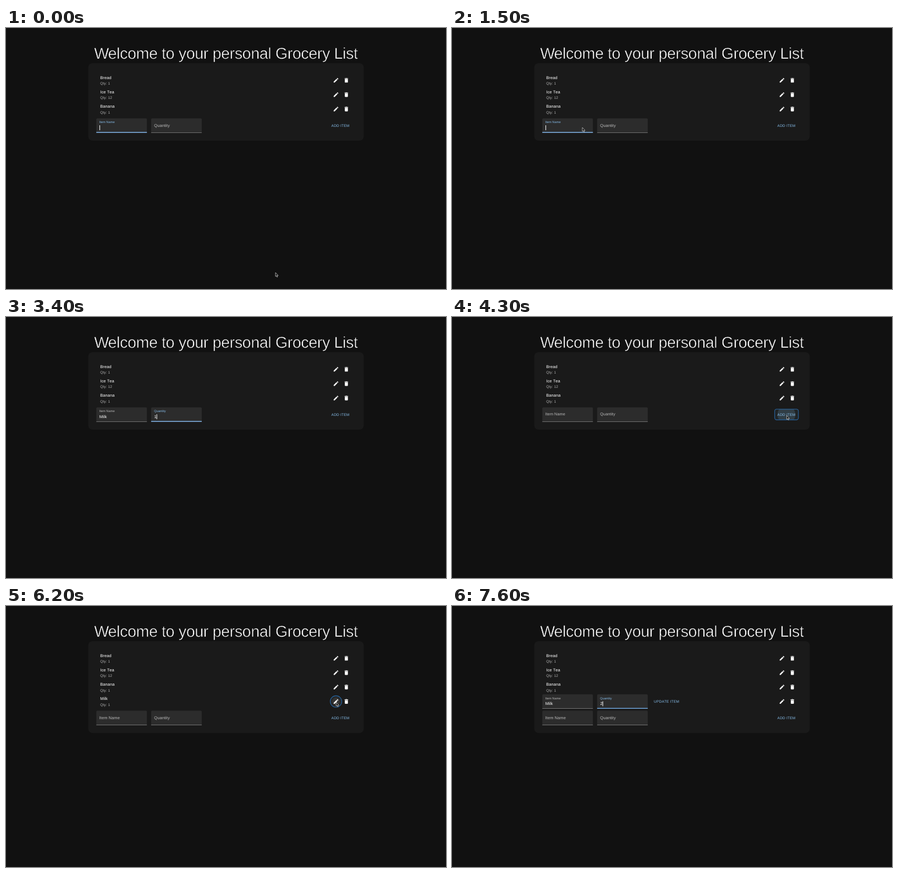
Recreate the animation shown at these times as an HTML page. Size 800x475 px, loop 8000 ms.

```html
<!DOCTYPE html>
<html lang="en">
<head>
<meta charset="utf-8">
<title>Grocery List</title>
<style>
  html, body { margin: 0; width: 100%; height: 100%; overflow: hidden; background: #111; }
  svg { display: block; width: 100%; height: 100%; }
  text {
    font-family: "Liberation Sans", Arial, sans-serif;
    font-kerning: none; white-space: pre; text-rendering: geometricPrecision;
  }
  /* A background-coloured outline thins the strokes to a light weight. */
  .title { font-size: 28.7px; letter-spacing: -.41px; fill: #fff; stroke: #111; stroke-width: .6px; }
  .title .w { letter-spacing: -1.9px; }
  .panel { fill: #1a1a1a; }
  .body { font-size: 7.5px; letter-spacing: .07px; fill: #fff; }
  .small { font-size: 6.56px; letter-spacing: .07px; fill: #b4b4b4; }
  .action { font-size: 6.56px; letter-spacing: .187px; fill: #88bfec; }
  .icon { fill: #fff; }
  .box { fill: #2c2c2c; }
  .line { fill: #a6a6a6; }
  .active { fill: #74ade6; }
  .label { font-size: 7.5px; letter-spacing: .07px; fill: #bababa; }
  .label.on { fill: #85bbe8; }
  .caret { fill: #fff; }
  .ring { fill: none; stroke: #2868a6; stroke-width: 1.1; }
  .tint { fill: #90caf9; }
  .glow { fill: #fff; }
  .mouse { fill: #111; stroke: #eee; stroke-width: .65; stroke-linejoin: round; }
</style>
</head>
<body>
<svg id="stage" viewBox="0 0 800 475">
  <defs>
    <path id="edit" d="M3 17.25V21h3.75L17.81 9.94l-3.75-3.75L3 17.25zM20.71 7.04c.39-.39.39-1.02 0-1.41l-2.34-2.34c-.39-.39-1.02-.39-1.41 0l-1.83 1.83 3.75 3.75 1.83-1.83z"/>
    <path id="bin" d="M6 19c0 1.1.9 2 2 2h8c1.1 0 2-.9 2-2V7H6v12zM19 4h-3.5l-1-1h-5l-1 1H5v2h14V4z"/>
    <clipPath id="pill"><rect x="587" y="168" width="42.5" height="18.8" rx="3"/></clipPath>
  </defs>
  <rect id="panel" class="panel" x="149.5" y="64" width="501" height="141" rx="8"/>
  <text class="title" x="160.3" y="56.1"><tspan class="w">W</tspan>elcome to your personal Grocery List</text>
  <g id="rows"></g>
  <g id="pencil">
    <circle id="pencilHover" class="glow" cx="600" cy="173.8" r="9.4" opacity=".06"/>
    <circle id="pencilRipple" class="glow" cx="600" cy="173.8" r="0"/>
    <circle class="ring" cx="600" cy="173.8" r="10.4"/>
  </g>
  <g id="form">
    <g clip-path="url(#pill)">
      <rect id="addHover" class="tint" x="587" y="168" width="42.5" height="18.8" opacity=".05"/>
      <circle id="addRipple" class="tint" cx="608" cy="177.4" r="0"/>
    </g>
    <rect id="addRing" class="ring" x="586.7" y="167.7" width="43.1" height="19.4" rx="3.6"/>
    <text class="action" x="591.6" y="179.7">ADD ITEM</text>
  </g>
  <g id="editor" transform="translate(0 -3.6)">
    <text class="action" x="367" y="179.7">UPDATE ITEM</text>
  </g>
  <path id="mouse" class="mouse" d="M0 -.4V6.7L1.6 5.3L2.7 7.8L3.8 7.4L2.8 4.9H4.9Z"/>
</svg>
<script>
const LOOP = 8000, STEP = 100, ROW = 26.2;
const $ = id => document.getElementById(id);

function add(parent, tag, attrs, text) {
  const el = document.createElementNS("http://www.w3.org/2000/svg", tag);
  for (const k in attrs) el.setAttribute(k, attrs[k]);
  if (text) el.textContent = text;
  return parent.appendChild(el);
}
const show = (el, on) => el.setAttribute("visibility", on ? "inherit" : "hidden");
const clamp = v => Math.min(1, Math.max(0, v));
const ramp = (t, start, dur = 200) => 1 - (1 - clamp((t - start) / dur)) ** 3;
const within = (t, a, b) => t >= a && t < b;

// List rows
function makeRow([name, qty], i) {
  const y = i * ROW;
  const row = add($("rows"), "g", {});
  const words = add(row, "g", {});
  add(words, "text", { class: "body", x: 171.3, y: 92.8 + y }, name);
  add(words, "text", { class: "small", x: 171.3, y: 103.2 + y }, "Qty: " + qty);
  [["edit", 600], ["bin", 618.8]].forEach(([id, x]) =>
    add(row, "use", { href: "#" + id, class: "icon",
      transform: `translate(${x - 5.63} ${89.5 + y}) scale(.469)` }));
  return { row, words };
}
const rows = [["Bread", 1], ["Ice Tea", 12], ["Banana", 1], ["Milk", 1]].map(makeRow);
const milk = rows[3];

// Filled text fields
function makeField(parent, x, name) {
  const g = add(parent, "g", { transform: `translate(${x} 164.4)` });
  add(g, "path", { class: "box", d: "M0 26.2V1.9Q0 0 1.9 0H90.1Q92 0 92 1.9V26.2Z" });
  add(g, "rect", { class: "line", y: 25.6, width: 92, height: .6 });
  const active = add(g, "rect", { class: "active", y: 24.8, height: 1.4 });
  const label = add(g, "text", { class: "label" }, name);
  const value = add(g, "text", { class: "body", x: 5.5, y: 19.4 });
  const caret = add(g, "rect", { class: "caret", y: 12.6, width: 1, height: 9 });

  return ({ text = "", focus = 0, shrink = 0, blink = false }) => {
    active.setAttribute("x", 46 * (1 - focus));
    active.setAttribute("width", 92 * focus);
    const size = 1 - .25 * shrink;
    label.setAttribute("transform", `translate(5.4 ${15.3 - 6.4 * shrink}) scale(${size})`);
    label.classList.toggle("on", focus > .5);
    value.textContent = text;
    caret.setAttribute("x", 5.8 + (text ? value.getComputedTextLength() - .3 : 0));
    show(caret, blink);
  };
}
const newName = makeField($("form"), 164.2, "Item Name");
const newQty = makeField($("form"), 263.9, "Quantity");
const editName = makeField($("editor"), 164.2, "Item Name");
const editQty = makeField($("editor"), 263.9, "Quantity");

// Pointer path: time, x, y
const path = [
  [0, 490, 445.5], [200, 470, 412], [400, 392, 312], [600, 302, 226], [800, 254, 186],
  [900, 246, 181], [1200, 237, 181.5], [3600, 237, 181.5], [3800, 330, 184],
  [4000, 530, 184], [4100, 598, 181], [4200, 608.6, 179.7], [4400, 608.6, 179.7],
  [4600, 560, 203], [4800, 400, 213], [5000, 288, 198], [5100, 300.3, 183],
  [5300, 342, 164], [5400, 400, 153], [5600, 520, 150], [5800, 588, 166],
  [5900, 600.3, 175.5], [6300, 600.3, 175.5], [6500, 520, 174], [6700, 400, 173],
  [6900, 320, 174], [7000, 310, 175]
];
function pointer(t) {
  const i = path.findIndex(p => p[0] > t);
  if (i < 0) return path[path.length - 1].slice(1);
  const [a, b] = [path[i - 1], path[i]];
  const k = (t - a[0]) / (b[0] - a[0]);
  return [a[1] + (b[1] - a[1]) * k, a[2] + (b[2] - a[2]) * k];
}

const typed = (t, keys) => keys.reduce((s, [at, text]) => t >= at ? text : s, "");
const blinking = (t, since) => (t - since) % 1120 < 560;

function ripple(el, t, start, radius, strength) {
  el.setAttribute("r", t < start ? 0 : radius * ramp(t, start, 550));
  el.setAttribute("opacity", strength * (1 - clamp((t - start - 100) / 500)));
}

function draw(t) {
  const added = t >= 4400, editing = t >= 6300;
  $("panel").setAttribute("height", added ? 141 + ROW : 141);
  $("form").setAttribute("transform", `translate(0 ${added ? ROW : 0})`);
  show(milk.row, added);
  show(milk.words, added && !editing);
  show($("editor"), editing);

  const cleared = ramp(t, 4200);
  newName({
    text: t < 4200 ? typed(t, [[1900, "M"], [2000, "Mi"], [2200, "Mil"], [2400, "Milk"]]) : "",
    focus: 1 - ramp(t, 2650),
    shrink: 1 - cleared,
    blink: t < 2700 && blinking(t, typed(t, [[0, 0], [1900, 1900], [2200, 2200], [2400, 2400]]))
  });
  newQty({
    text: within(t, 3200, 4200) ? "1" : "",
    focus: ramp(t, 2650) - ramp(t, 4100),
    shrink: ramp(t, 2650) - cleared,
    blink: within(t, 2700, 4100) && blinking(t, t < 3200 ? 2700 : 3200)
  });
  editName({ text: "Milk", shrink: 1 });
  editQty({
    text: t < 7300 ? "1" : t < 7600 ? "" : "2",
    focus: ramp(t, 7000),
    shrink: 1,
    blink: t >= 7100 && blinking(t, t < 7600 ? 7100 : 7600)
  });

  show($("addHover"), within(t, 4100, 4400));
  show($("addRing"), within(t, 4100, 6000));
  ripple($("addRipple"), t, 4100, 22, .19);
  show($("pencil"), within(t, 5900, 7000));
  show($("pencilHover"), t < 6400);
  show($("pencil").lastElementChild, t >= 6000);
  ripple($("pencilRipple"), t, 6000, 9.4, .08);

  $("mouse").setAttribute("transform", `translate(${pointer(t)})`);
  show($("mouse"), t < 1900 || within(t, 3600, 7200));
}

// The picture advances ten times a second.
function tick(now) {
  draw(Math.floor(now % LOOP / STEP) * STEP);
  requestAnimationFrame(tick);
}
draw(0);
requestAnimationFrame(tick);
</script>
</body>
</html>
```
